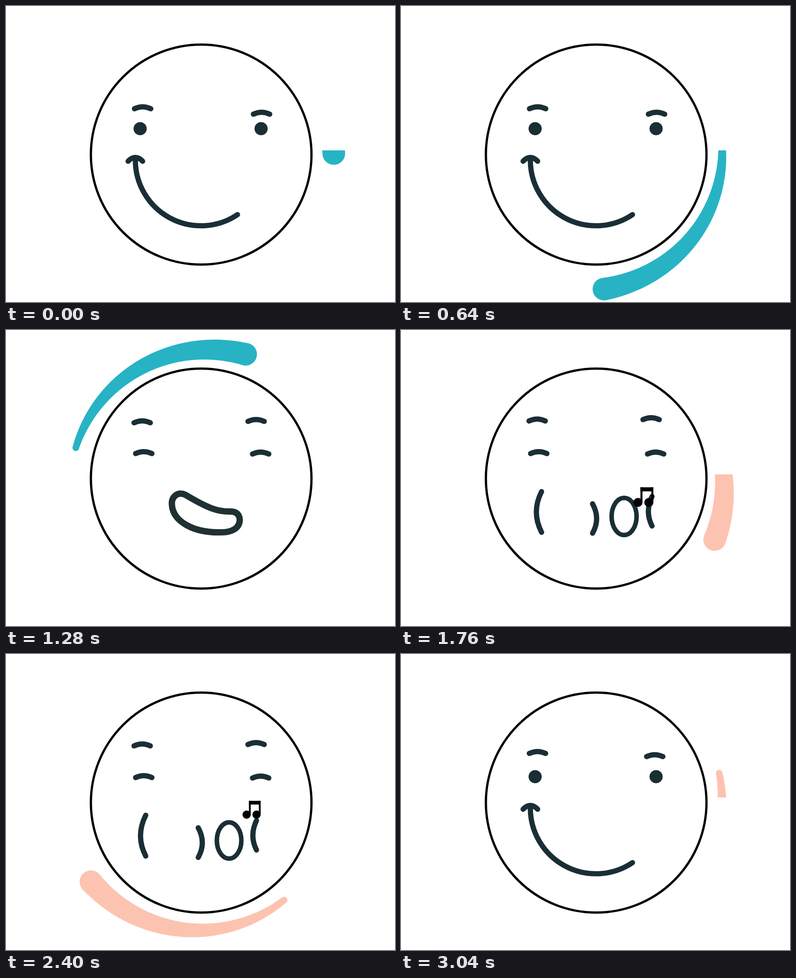
An HTML page with a canvas for the animation above (3.12 s loop, 857 by 654 pixels).

```html
<!DOCTYPE html>
<html lang="en">
<head>
<meta charset="utf-8">
<title>Smile, laugh, whistle</title>
<style>
  html, body { margin: 0; width: 100%; height: 100%; overflow: hidden; background: #fff; }
  canvas { display: block; }
</style>
</head>
<body>
<canvas id="stage" width="857" height="654"></canvas>
<script>
const ctx = document.getElementById('stage').getContext('2d');
const LOOP = 3120, STEP = 80;
const INK = '#1a2e35', TEAL = '#27b3c4', PINK = '#fcc3b0';
const LAUGH = 720, WHISTLE = 1760, SMILE = 2800, SCENE = 1040;

function disc(x, y, r, color) {
  ctx.fillStyle = color;
  ctx.beginPath();
  ctx.arc(x, y, r, 0, 7);
  ctx.fill();
}

function line(d, width = 11.5, color = INK) {
  ctx.lineWidth = width;
  ctx.strokeStyle = color;
  ctx.lineCap = ctx.lineJoin = 'round';
  ctx.stroke(new Path2D(d));
}

const lid = (x, y) => line(`M${x - 18} ${y}q18 -8.4 36 0`);

// Tapered streak running clockwise around the face
function comet(head, color) {
  const cx = 427, cy = 331, length = 95.5, n = 60;
  const edge = [];
  for (let i = 0; i <= n; i++) {
    const u = i / n;
    const a = (head - length * (1 - u)) * Math.PI / 180;
    const mid = 282.3 + 12.9 * u - 34 * u * (1 - u), half = 7.2 + 17.8 * u;
    edge.push({ c: Math.cos(a), s: Math.sin(a), mid, half });
  }
  ctx.save();
  // It rises out of one horizontal line and sinks behind it again
  ctx.beginPath();
  if (head < 120) {
    ctx.rect(0, 319, 857, 335);
  } else {
    ctx.rect(0, 0, 857, 317);
    ctx.rect(0, 317, head < 250 ? 857 : cx, 337);
  }
  ctx.clip();
  ctx.fillStyle = color;
  ctx.beginPath();
  for (const p of edge) ctx.lineTo(cx + p.c * (p.mid + p.half), cy + p.s * (p.mid + p.half));
  for (const p of edge.slice().reverse())
    ctx.lineTo(cx + p.c * (p.mid - p.half), cy + p.s * (p.mid - p.half));
  ctx.fill();
  for (const p of [edge[0], edge[n]]) disc(cx + p.c * p.mid, cy + p.s * p.mid, p.half, color);
  ctx.restore();
}

// Head angle in degrees, steadily speeding up
function orbit(t, color) {
  const s = t / 1000;
  const head = -1 + 96.7 * s + 48 * s ** 2 + 33 * s ** 4;
  if (s >= 0 && head < 453) comet(head, color);
}

function smile() {
  disc(295.5, 271, 14.5, INK);
  disc(562, 271, 14.5, INK);
  line('M269 343Q285 326 301 343');
  line('M285 340A144.5 145 0 0 0 510 461');
}

function laugh() {
  line('M395 364C379 356 364 368 365.5 386C368 425 416 448 471 447' +
    'C500 448 515 436 515 419C514 407 507 401 495 401C468 402 447 395 395 364Z', 14, '#1f3133');
}

function whistle(q) {
  const x1 = 309.7 - 3.7 * q, x2 = 422 + 3 * q, x3 = 553 - 2.3 * q;
  line(`M${x1} ${357 - 1.5 * q}Q${x1 - 23} 402 ${x1} ${447 - q}`);
  line(`M${x2} 384Q${x2 + 18} 417 ${x2} ${449 + q}`);
  line(`M${x3} 368Q${x3 - 16} 401 ${x3} 433`);
  ctx.lineWidth = 10;
  ctx.beginPath();
  ctx.ellipse(491.5, 412, 27.5 - q, 41 - 2 * q, 0, 0, 7);
  ctx.stroke();
}

// Notes leave the mouth every 480 ms; the third one is single
function note(age) {
  const t = age % 480, size = 1 - 0.09 * t / 160;
  ctx.save();
  ctx.translate(534 + 7 * t / 160, 391 - 188 * (t / 400) ** 2.118);
  ctx.scale(size, size);
  if (age >= 960) {
    disc(1.5, -10.5, 10, '#000');
    ctx.fillRect(6.5, -44, 4.5, 34);
    ctx.fillRect(6.5, -44, 14.5, 9);
  } else {
    for (const x of [-12, 12]) {
      disc(x, -10, 10, '#000');
      ctx.fillRect(x + 5.5, -43.5, 4.5, 34);
    }
    ctx.fillRect(-6.5, -43.5, 28.5, 9);
  }
  ctx.restore();
}

function brows(drop, sink) {
  lid(300 + sink, 201 + 4 * drop + 22 * sink);
  lid(551 + 12 * sink, 198 + 4 * drop + 37 * sink);
}

function face(t) {
  if (t < LAUGH || t >= SMILE) {
    const age = (t - SMILE + LOOP) % LOOP;
    brows(1, Math.min(1, Math.max(0, (age - 80) / 240)));
    smile();
    return;
  }
  lid(303.5, 273);
  lid(561, 274);
  if (t < WHISTLE) {
    brows(Math.sin(Math.PI * (t - LAUGH) / SCENE), 0);
    laugh();
  } else {
    const q = ((t - WHISTLE) / 960) ** 1.7;
    brows(q, 0);
    whistle(q);
  }
}

function draw(t) {
  ctx.fillStyle = '#fff';
  ctx.fillRect(0, 0, 857, 654);
  ctx.lineWidth = 5;
  ctx.strokeStyle = '#000';
  ctx.beginPath();
  ctx.arc(430, 328.3, 243, 0, 7);
  ctx.stroke();
  face(t);
  if (t >= WHISTLE && t < SMILE + STEP) note(t - WHISTLE);
  orbit(t, TEAL);
  orbit(t - 1508, PINK);
}

const start = performance.now();
function tick() {
  const t = Math.max(0, performance.now() - start) % LOOP;
  draw(Math.floor(t / STEP) * STEP);
  requestAnimationFrame(tick);
}
tick();
</script>
</body>
</html>
```
